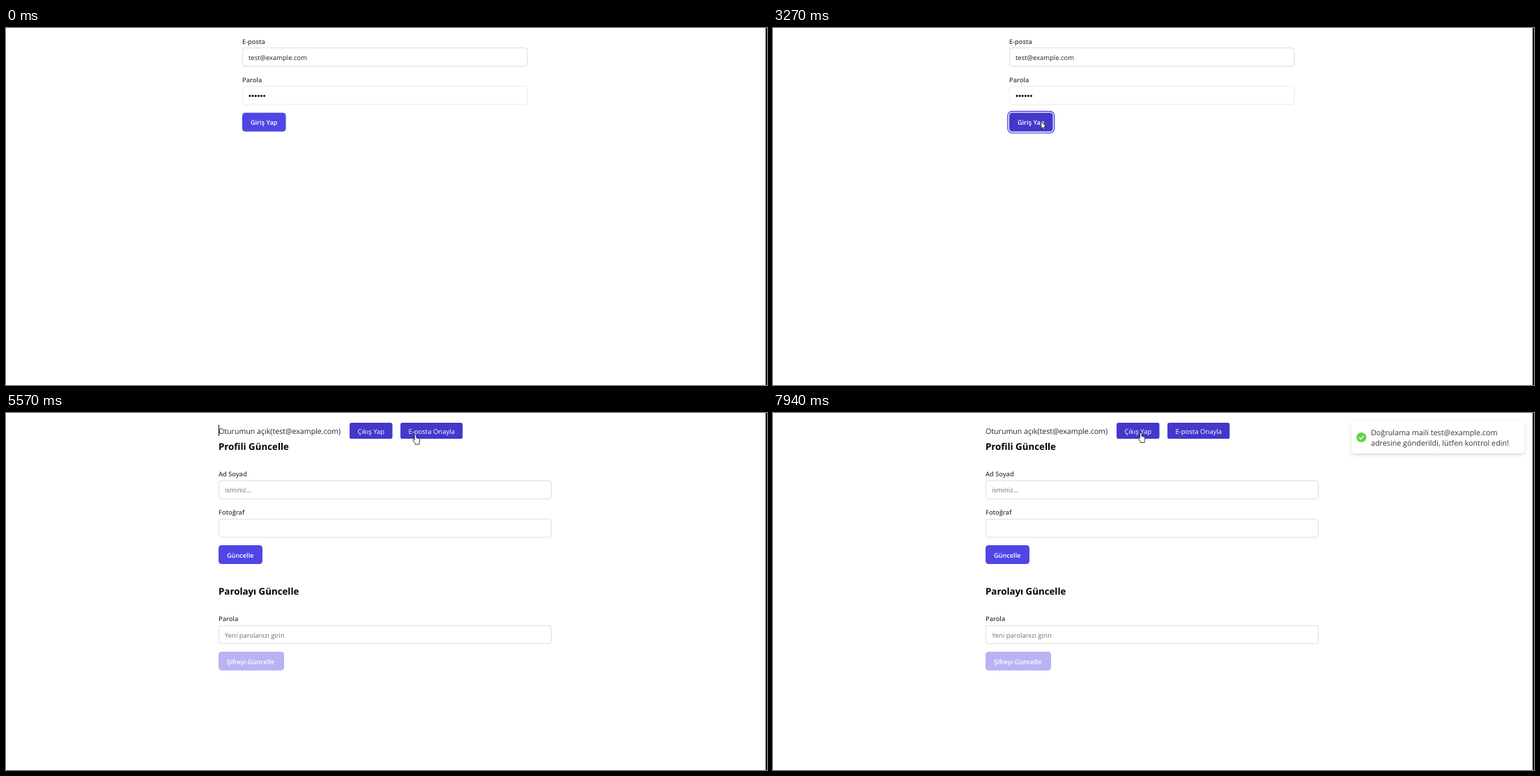
Animation of 1092x513 px, one loop 8000 ms. Source, as an HTML page:

```html
<!DOCTYPE html>
<html lang="tr">
<head>
<meta charset="utf-8">
<title>Giriş</title>
<style>
  html, body { margin: 0; width: 100%; height: 100%; overflow: hidden; background: #fff; }
  svg { display: block; width: 1092px; height: 513px; }
  text { font: 9.45px "Open Sans", "Noto Sans", sans-serif; fill: #1f2430; text-rendering: geometricPrecision; }
  .label { font-size: 9.2px; font-weight: 600; fill: #374151; }
  .hint { fill: #6b7280; }
  .title { font-size: 13.3px; font-weight: 700; fill: #000; }
  .lead { font-size: 10.63px; }
  .button { font-size: 9.2px; font-weight: 600; fill: #fff; }
  .link { font-size: 9.5px; fill: #fff; }
  .field { fill: #fff; stroke: #d1d5db; stroke-width: .8; filter: drop-shadow(0 .7px .7px #0000000d); }
  .pale { stroke: #e5e7eb; }
  #toast { transform-origin: 954px 35px; }
  #toast text { font-size: 10.78px; fill: #363636; }
  #card { fill: #fff; filter: drop-shadow(0 2px 3.5px #0000001c) drop-shadow(0 2px 1px #0000000d); }
  #badge { transform-origin: 844.3px 35px; }
  #pointer path { fill: #fff; stroke: #000; stroke-width: .75; stroke-linejoin: round; }
</style>
</head>
<body>
<svg viewBox="0 0 1092 513">
  <g id="login"></g>
  <g id="profile"></g>
  <g id="toast">
    <rect id="card" x="830" y="11.5" width="248.5" height="46.6" rx="5.7"/>
    <g id="badge">
      <circle cx="844.3" cy="35" r="7.1" fill="#61d345"/>
      <path id="check" d="M841.2 35.3l2.2 2.3 4.1-5" pathLength="1" stroke-dasharray="1 2"
            fill="none" stroke="#fff" stroke-width="1.4"/>
    </g>
    <text x="858" y="31.9">Doğrulama maili test@example.com</text>
    <text x="858" y="46.7">adresine gönderildi, lütfen kontrol edin!</text>
  </g>
  <rect x="1090" width="2" height="513"/>
  <g id="pointer">
    <path id="arrow" d="M0 0V10.2L2.4 8.1 4 11.6 5.6 10.9 4.1 7.4H7.2Z"/>
    <path id="hand" d="M-1.4 8.2V1.2a1.3 1.3 0 0 1 2.6 0V4.8l3.6.9q1.5.4 1.3 2L5.4 11.2V14H-.6V12.5L-3.7 8.6q-.5-1.4.6-1.6 1 0 1.7 1.2Z"/>
  </g>
</svg>
<script>
const LOOP = 8000, PAGE_SWITCH = 3380, CLICK = 2610;
const EMAIL = 'test@example.com';
const $ = id => document.getElementById(id);
const show = (el, on) => el.setAttribute('visibility', on ? 'visible' : 'hidden');

const text = (x, y, cls, str) => `<text x="${x}" y="${y}" class="${cls}">${str}</text>`;
const field = (x, y, w, label, value = '', cls = '') =>
  text(x, y - 5.6, 'label', label) +
  `<rect class="field ${cls}" x="${x + .4}" y="${y + .4}" width="${w - .8}" height="26.2" rx="3.9"/>` +
  text(x + 9, y + 17.6, label === 'E-posta' ? '' : 'hint', value);
const button = (x, y, w, label, extra = '') =>
  `<g ${extra}><rect x="${x}" y="${y}" width="${w}" height="27" rx="4.2" fill="#4f46e5"/>` +
  text(x + 11.9, y + 17.6, 'button', label) + '</g>';
const link = (x, w, label) =>
  `<rect x="${x}" y="14" width="${w}" height="23" rx="2.8" fill="#4338ca"/>` +
  text(x + 11.4, 30.2, 'link', label);

$('login').innerHTML =
  field(339, 28.2, 409.5, 'E-posta', EMAIL) +
  field(339, 83.3, 409.5, 'Parola', '', 'pale') +
  [0, 1, 2, 3, 4, 5].map(i => `<circle cx="${350 + 4.1 * i}" cy="97.5" r="1.5"/>`).join('') +
  '<rect id="ring" x="336.9" y="119.7" width="66.7" height="31.2" rx="6.3" fill="#fff" stroke="#4f46e5" stroke-width="1.42"/>' +
  button(339, 121.8, 62.6, 'Giriş Yap', 'id="submit"');

$('profile').innerHTML =
  text(305, 30.3, 'lead', `Oturumun açık(${EMAIL})`) +
  '<rect id="caret" x="305" y="17" width="1" height="16"/>' +
  link(493, 61.5, 'Çıkış Yap') + link(566, 89.3, 'E-posta Onayla') +
  text(305, 52.7, 'title', 'Profili Güncelle') +
  field(305, 96.8, 477.8, 'Ad Soyad', 'isminiz...') +
  field(305, 152, 477.8, 'Fotoğraf') +
  button(305, 190, 63, 'Güncelle') +
  text(305, 260.9, 'title', 'Parolayı Güncelle') +
  field(305, 305, 477.8, 'Parola', 'Yeni parolanızı girin') +
  button(305, 343, 94, 'Şifreyi Güncelle', 'opacity=".4"');

// Pointer moves: first step, last step, number of steps, destination
const START = [1046, 564];
const MOVES = [
  [610, 730, 3, 897, 256],
  [980, 1100, 3, 591, 165.5],
  [1350, 1410, 2, 426, 163.5],
  [1660, 1660, 1, 420.3, 161.8],
  [1720, 2170, 8, 384.9, 134.5],
  [4040, 4160, 3, 480.6, 83.6],
  [4410, 5200, 12, 573.5, 56],
  [5260, 5570, 6, 587.7, 31],
  [7440, 7750, 6, 532.8, 28.8],
  [7940, 7940, 1, 527.8, 28.5],
];

function pointerAt(t) {
  let [x, y] = START;
  for (const [from, to, steps, tx, ty] of MOVES) {
    if (t < from) break;
    const gap = (to - from) / (steps - 1 || 1) || 1;
    const part = Math.min(steps, Math.floor((t - from) / gap + 1e-6) + 1) / steps;
    x += (tx - x) * part;
    y += (ty - y) * part;
  }
  return [x, y];
}

const inside = (x, y, left, top, right, bottom) => x >= left && x <= right && y >= top && y <= bottom;

// Toast entrance, scrubbed by the clock
const scrub = (id, frames, options) => {
  const animation = $(id).animate(frames, { fill: 'both', ...options });
  animation.pause();
  return animation;
};
const entrance = [
  scrub('toast', [
    { transform: 'translateY(-93px) scale(.6)', opacity: .5 },
    { transform: 'translateY(0px) scale(1)', opacity: 1 },
  ], { duration: 350, easing: 'cubic-bezier(.21,1.02,.73,1)' }),
  scrub('badge', [{ transform: 'scale(0)', opacity: 0 }, { transform: 'scale(1)', opacity: 1 }],
    { duration: 300, delay: 100, easing: 'cubic-bezier(.175,.885,.32,1.275)' }),
  scrub('check', [{ strokeDashoffset: 1 }, { strokeDashoffset: 0 }],
    { duration: 200, delay: 200, easing: 'ease-out' }),
];

function draw(t) {
  const onProfile = t >= PAGE_SWITCH;
  $('login').style.display = onProfile ? 'none' : '';
  $('profile').style.display = onProfile ? '' : 'none';

  const [x, y] = pointerAt(t);
  const overLink = onProfile && (inside(x, y, 493, 14, 554.5, 37) || inside(x, y, 566, 14, 655, 37));
  $('pointer').setAttribute('transform', `translate(${x} ${y})`);
  show($('arrow'), !overLink);
  show($('hand'), overLink);

  const hover = inside(x, y, 339, 122, 401.5, 149);
  $('submit').firstChild.setAttribute('fill', hover ? '#4338ca' : '#4f46e5');
  show($('ring'), t >= CLICK);
  show($('caret'), t < 3850 || (t >= 4410 && t < 4940) || (t >= 5440 && t < 5940));

  show($('toast'), t >= 6620);
  const step = Math.max(0, Math.min(6, Math.floor((t - 6620) / 63.3)));
  for (const animation of entrance) animation.currentTime = 70 + step * 63.3;
}

function tick() {
  draw(performance.now() % LOOP);
  requestAnimationFrame(tick);
}
tick();
</script>
</body>
</html>
```
